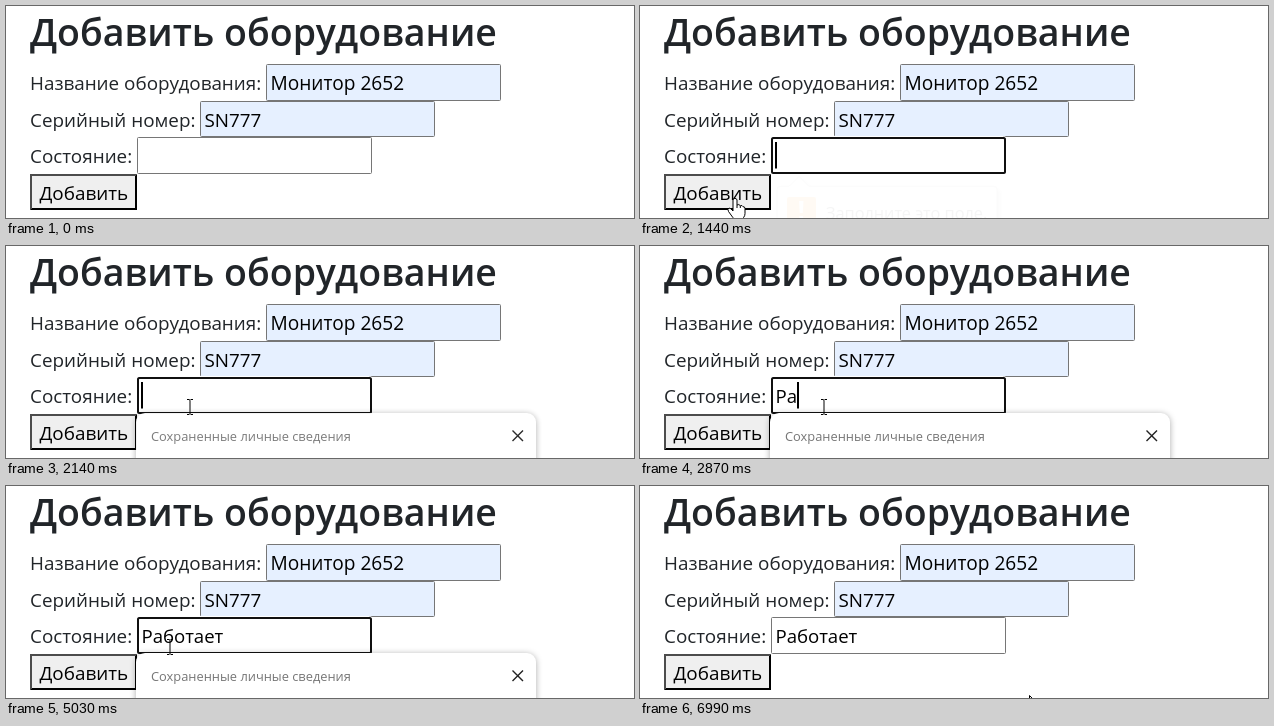
Write an HTML page that moves like this. It is 628 px wide and 212 px high and loops after 7060 ms.

```html
<!DOCTYPE html>
<html lang="ru">
<meta charset="utf-8">
<title>Добавить оборудование</title>
<style>
  html, body { margin: 0; width: 100%; height: 100%; overflow: hidden; background: #fff; }
  svg { display: block; font: 18.85px "Open Sans", "Noto Sans", sans-serif; fill: #212529; }
  .title { font-size: 37.5px; font-weight: 600; }
  .field { fill: #fff; stroke: #767676; }
  .filled { fill: #e6f0ff; }
  .value { fill: #000; }
  .bubble { filter: drop-shadow(3px 3px 2px #0006); }
  .popup { filter: drop-shadow(0 1px 3px #0005); }
</style>
<svg width="628" height="212" viewBox="0 0 628 212">
  <text class="title" x="24" y="40">Добавить оборудование</text>
  <text x="24" y="84">Название оборудования:</text>
  <text x="24" y="121">Серийный номер:</text>
  <text x="24" y="157">Состояние:</text>

  <rect class="field filled" x="260.5" y="58.5" width="234" height="36" rx="1"/>
  <text class="value" x="264.5" y="84" font-size="19.1">Монитор 2652</text>
  <rect class="field filled" x="194.5" y="95.5" width="234" height="35" rx="1"/>
  <text class="value" x="198.5" y="121">SN777</text>
  <rect class="field" x="131.5" y="131.5" width="234" height="36" rx="1"/>

  <rect id="face" x="24" y="168" width="107" height="36"/>
  <path id="bevelTop" d="M24 204V168H131l-2 2H26v32z"/>
  <path id="bevelBottom" d="M24 204H131V168l-2 2v32H26z"/>
  <text class="value" x="33.5" y="194">Добавить</text>

  <g id="focus" fill="none">
    <rect x="130.5" y="130.5" width="236" height="38" rx="3" stroke="#fff"/>
    <rect x="132" y="132" width="233" height="35" rx="1.5" stroke="#101010" stroke-width="2"/>
  </g>
  <text class="value" id="typed" x="135.5" y="157" font-size="18.6"></text>
  <rect class="value" id="caret" y="136" width="2" height="26.5"/>

  <g id="bubble">
    <path class="bubble" fill="#fff" stroke="#aaa"
      d="M140.5 178.5H149l10-10 10 10H354q3 0 3 3V230H137V181.5q0-3 3.5-3z"/>
    <rect x="147" y="189" width="29" height="29" rx="2" fill="#ff9410"/>
    <path d="M159 193h4.500l-.7 12h-3.100zM159.300 208h3.800v4h-3.800z" fill="#fff"/>
    <text x="186" y="211" font-size="16.3">Заполните это поле.</text>
  </g>

  <g id="popup">
    <rect class="popup" x="130" y="167" width="400" height="70" rx="9" fill="#fff"/>
    <text x="145" y="194.5" font-size="12.85" fill="#767676">Сохраненные личные сведения</text>
    <path d="M506.5 184.500l10.500 10.500m0-10.500l-10.500 10.500" stroke="#222" stroke-width="1.4"/>
  </g>

  <g id="cursor" fill="#fff" stroke="#000">
    <path id="arrow" d="M.5.5V17l4-3.800 2.600 6 2.600-1.100-2.500-6H12z"/>
    <path id="beam" fill="none" d="M-3-7.500h2.200l.8.8.8-.8H3M0-6.700V6.700M-3 7.500h2.200l.8-.8.8.8H3"/>
    <path id="hand" stroke-linejoin="round" d="M-2 1.500q2-2.500 4 0v5.500q2-1.200 3.300.7 2-.8 2.700 1 2-.3 2 2v5
      q0 2-1.500 4v2.300H-2v-2.300l-4.500-6.200q-1.500-3 .5-3.500 1.500 0 4 3zM2 7v3M5.300 8v2"/>
  </g>
</svg>
<script>
const LOOP = 7060, STEP = 70, BLINK = 530;
const FOCUS = 1440, CLICK = 2010, BLUR = 5570;

// The cursor rests between moves; bend lifts a move off its straight line.
const moves = [
  { start: 200, end: 970, to: [95, 192], bend: -56, power: 2 },
  { start: 1440, end: 1790, to: [184, 161], bend: 0, power: 1 },
  { start: 4960, end: 5310, to: [82, 187], bend: -8, power: 1 },
  { start: 6500, end: 6990, to: [389, 209], bend: 0, power: 1 }
];
const word = 'Работает';
const typing = [
  { start: 2670, gap: 200, count: 2 },
  { start: 3550, gap: 130, count: 2 },
  { start: 3880, gap: 90, count: 4 }
];
const keyTimes = typing.flatMap(({ start, gap, count }) =>
  Array.from({ length: count }, (_, i) => start + i * gap));

const el = id => document.getElementById(id);
const clamp = v => Math.max(0, Math.min(1, v));
const within = (v, from, to) => v >= from && v < to;
const show = (id, opacity) => el(id).setAttribute('opacity', +opacity);
const progress = (t, start, end) => clamp((t - start) / (end - start));
const stepFrom = (t, start) => start + Math.floor((t - start) / STEP) * STEP;

function cursorAt(t) {
  let [x, y] = [421, 200];
  for (const { start, end, to, bend, power } of moves) {
    const k = 1 - (1 - progress(stepFrom(t, start), start, end)) ** power;
    x += (to[0] - x) * k;
    y += (to[1] - y) * k + bend * Math.sin(Math.PI * k);
    if (t < end) break;
  }
  return [x, y];
}

function drawCursor(t) {
  const [x, y] = cursorAt(t);
  const shape = within(x, 24, 131) && within(y, 168, 204) ? 'hand'
    : within(x, 131, 366) && within(y, 131, 168) ? 'beam' : 'arrow';
  for (const id of ['arrow', 'beam', 'hand']) show(id, id === shape);
  el('cursor').setAttribute('transform', `translate(${Math.round(x)} ${Math.round(y)})`);
  show('cursor', t >= moves[0].start);
}

function drawButton(t) {
  const pressed = within(t, 1170, FOCUS) || within(t, BLUR, BLUR + 2 * STEP);
  el('face').setAttribute('fill', pressed ? '#f5f5f5' : '#efefef');
  el('bevelTop').setAttribute('fill', pressed ? '#000' : '#4c4c4c');
  el('bevelBottom').setAttribute('fill', pressed ? '#4c4c4c' : '#000');
}

function drawInput(t) {
  const typed = el('typed');
  typed.textContent = word.slice(0, keyTimes.filter(time => time <= t).length);
  const focused = within(t, FOCUS, BLUR);
  const lastInput = [FOCUS, CLICK, ...keyTimes].findLast(time => time <= t);
  const caretOn = Math.floor((t - lastInput) / BLINK) % 2 === 0;
  el('caret').setAttribute('x', 135 + Math.round(typed.getComputedTextLength()));
  show('focus', focused);
  show('caret', focused && caretOn);
}

function drawOverlays(t) {
  const appear = 0.04 + 0.96 * progress(stepFrom(t, FOCUS), FOCUS, FOCUS + 3 * STEP);
  show('bubble', within(t, FOCUS, CLICK) && appear);
  el('bubble').setAttribute('transform', `translate(0 ${2 * (1 - appear)})`);
  const opening = progress(stepFrom(t, FOCUS), CLICK - STEP, CLICK + 2 * STEP);
  const closing = progress(stepFrom(t, BLUR), BLUR - STEP, BLUR + 3 * STEP);
  show('popup', t >= CLICK && opening * (1 - closing));
}

function draw() {
  const t = performance.now() % LOOP;
  drawCursor(t);
  drawButton(t);
  drawInput(t);
  drawOverlays(t);
  requestAnimationFrame(draw);
}
draw();
</script>
</html>
```
